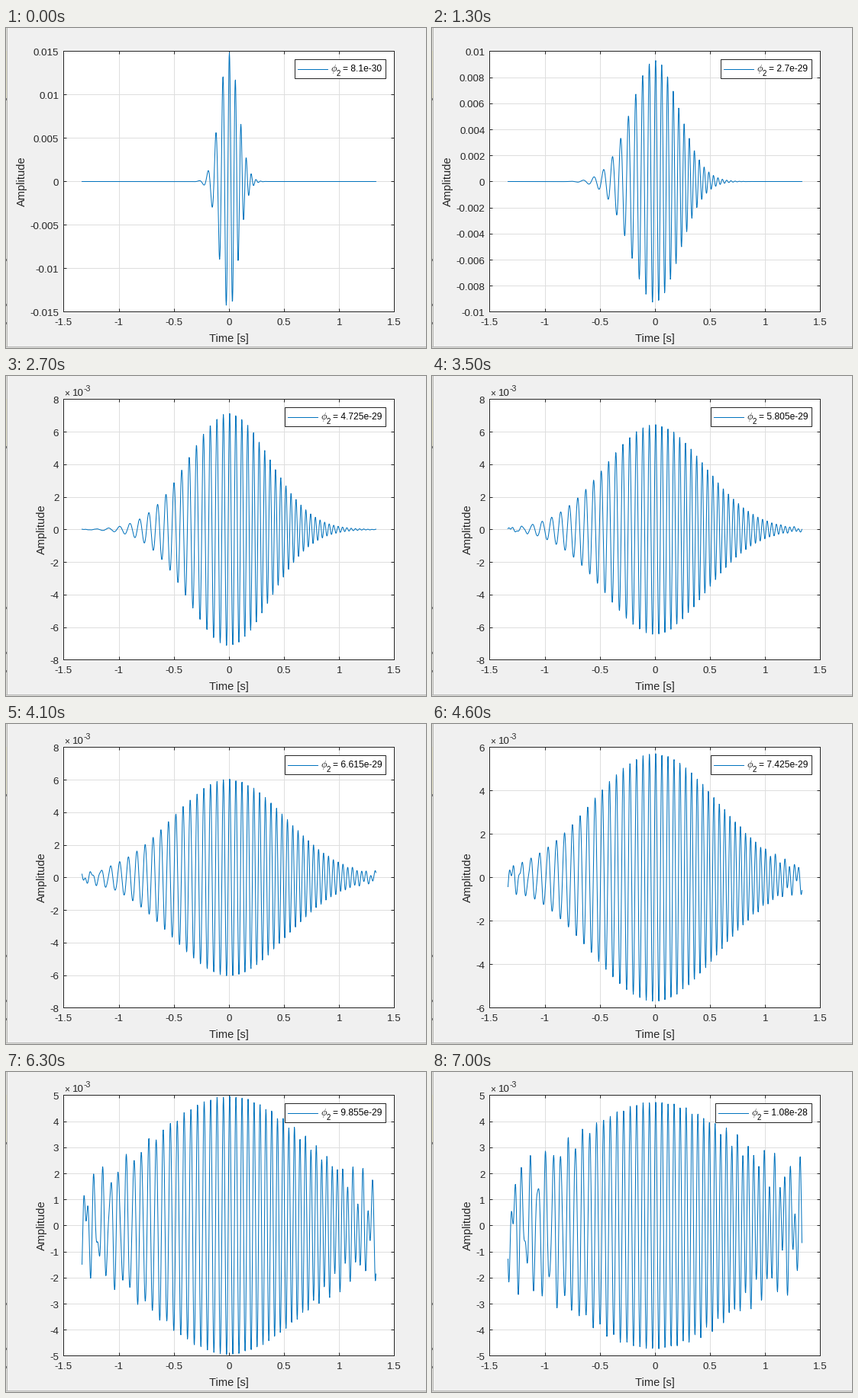
These frames come from a looping animation (550x420 px, 7100 ms). A matplotlib script:

```python
import numpy as np
import matplotlib.pyplot as plt
from matplotlib.animation import FuncAnimation
from matplotlib.patches import Rectangle

W, H, DPI = 550, 420, 100
PX = 72 / DPI                       # points per pixel
FRAMES, INTERVAL = 71, 100
MID = 0.49                          # just under a pixel centre, so lines snap to it
LEFT, RIGHT, TOP, BOTTOM = 75 + MID, 508 + MID, 30 + MID, 372 + MID
INK, BLUE, PAPER = "#262626", "#0072bd", "#f0f0f0"

# Gaussian pulse and dispersion
PHI_STEP = 1.35e-30                 # dispersion per step
FIRST, LAST = 6, 80                 # step range
DELAY = 6.01e-4                     # group delay slope per step
WIDTH, CARRIER, PEAK = 0.0575, 17.65, 0.01808
T = np.linspace(-4 / 3, 4 / 3, 1024)
PERIOD = T[-1] - T[0] + T[1] - T[0]

# (axis limit, tick step)
SCALES = [(0.005, 0.001), (0.006, 0.002), (0.008, 0.002),
          (0.01, 0.002), (0.015, 0.005)]

plt.rcParams["font.family"] = "Liberation Sans"


def pulse(t, step):
    q = 1 + 1j * step * DELAY / WIDTH**2
    wave = np.exp(-t**2 / (2 * WIDTH**2 * q) + 2j * np.pi * CARRIER * t)
    return PEAK * (wave / np.sqrt(q)).real


def signal(step):
    """Pulse wrapped around the periodic time window."""
    return sum(pulse(T + k * PERIOD, step) for k in (-1, 0, 1))


fig = plt.figure(figsize=(W / DPI, H / DPI), dpi=DPI, facecolor=PAPER)

ax = fig.add_axes([LEFT / W, 1 - BOTTOM / H,
                   (RIGHT - LEFT) / W, (BOTTOM - TOP) / H])
ax.set_xlim(-1.5, 1.5)
ax.set_xticks(np.arange(-1.5, 1.6, 0.5))
ax.set_xticklabels(["-1.5", "-1", "-0.5", "0", "0.5", "1", "1.5"])
ax.set_axisbelow(True)
ax.grid(color="#dedede", lw=PX)
ax.tick_params(direction="in", top=True, right=True, length=4.3 * PX,
               width=PX, color=INK, labelcolor=INK, labelsize=13.33 * PX)
ax.tick_params(axis="x", pad=9 * PX)
ax.tick_params(axis="y", labelleft=False)
for spine in ax.spines.values():
    spine.set(color=INK, linewidth=PX)
curve, = ax.plot(T, 0 * T, color=BLUE, lw=PX)

# Overlay in pixel coordinates
top = fig.add_axes([0, 0, 1, 1], zorder=5)
top.set(xlim=(0, W), ylim=(H, 0))
top.axis("off")


def label(x, y, text, size, **kw):
    kw = {"color": INK, "va": "baseline", **kw}
    return top.text(x, y, text, fontsize=size * PX, **kw)


def block(x, y, w, h, color):
    top.add_patch(Rectangle((x, y), w, h, fc=color, ec="none"))


# Slivers of the window edge
block(0, 0, 1, H, "#e4e4e0")
block(0, 30, 1, 65, "#e6e4cc")
block(1, 0, 1, H, "#b4b4b0")
block(0, 418, W, 1, "#b8b8b8")
block(0, 419, W, 1, "#dcdcd8")
for mark in (92, 303, 362, 386):
    block(0, mark, 1, 3, "#707070")

label(292, 412, "Time [s]", 14.67, ha="center")
ylabel = label(21, 201.5, "Amplitude", 14.67, rotation=90,
               ha="center", va="center")
power = [label(76, 26, "×", 12), label(86.5, 26, "10", 13.33),
         label(101.5, 20.5, "-3", 10.5)]
tick_labels = [label(69.3, 0, "", 13.33, ha="right") for _ in range(11)]

box = Rectangle((378 + MID, 41 + MID), 119, 25, fc="white", ec=INK, lw=PX)
top.add_patch(box)
sample, = top.plot([], [], color=BLUE, lw=PX)
phi = label(0, 57, r"$\phi$", 12.5, math_fontfamily="cm", color="black")
sub = label(0, 63, "2", 9.6, color="black")
value = label(0, 57, "", 12, color="black")


def draw_legend(step):
    text = format(step * PHI_STEP, ".5g")
    x = round(378 - 6.67 * (len(text) - 7)) + MID
    box.set_x(x)
    box.set_width(497 + MID - x)
    sample.set_data([x + 4, x + 43], [54 + MID] * 2)
    phi.set_x(x + 46.5)
    sub.set_x(x + 54.5)
    value.set_x(x + 63)
    value.set_text("= " + text)


def draw_scale(peak):
    limit, tick = next((s for s in SCALES if peak <= s[0]), SCALES[-1])
    small = limit < 0.01
    count = round(limit / tick)
    ticks = np.arange(-count, count + 1) * tick
    ax.set_ylim(-limit, limit)
    ax.set_yticks(ticks)
    for text in tick_labels:
        text.set_text("")
    for text, v in zip(tick_labels, ticks):
        y = (TOP + BOTTOM) / 2 - v / limit * (BOTTOM - TOP) / 2
        text.set_y(y + 5.5)
        text.set_text(f"{v * 1000 if small else v:g}")
    ylabel.set_x(47 if small else 21)
    for part in power:
        part.set_visible(small)


def update(i):
    step = FIRST + round(i * (LAST - FIRST) / (FRAMES - 1))
    y = signal(step)
    curve.set_ydata(y)
    draw_scale(np.abs(y).max())
    draw_legend(step)
    return []


anim = FuncAnimation(fig, update, frames=FRAMES, interval=INTERVAL,
                     init_func=lambda: update(0), repeat=True,
                     repeat_delay=0, blit=False)
plt.show()
```
